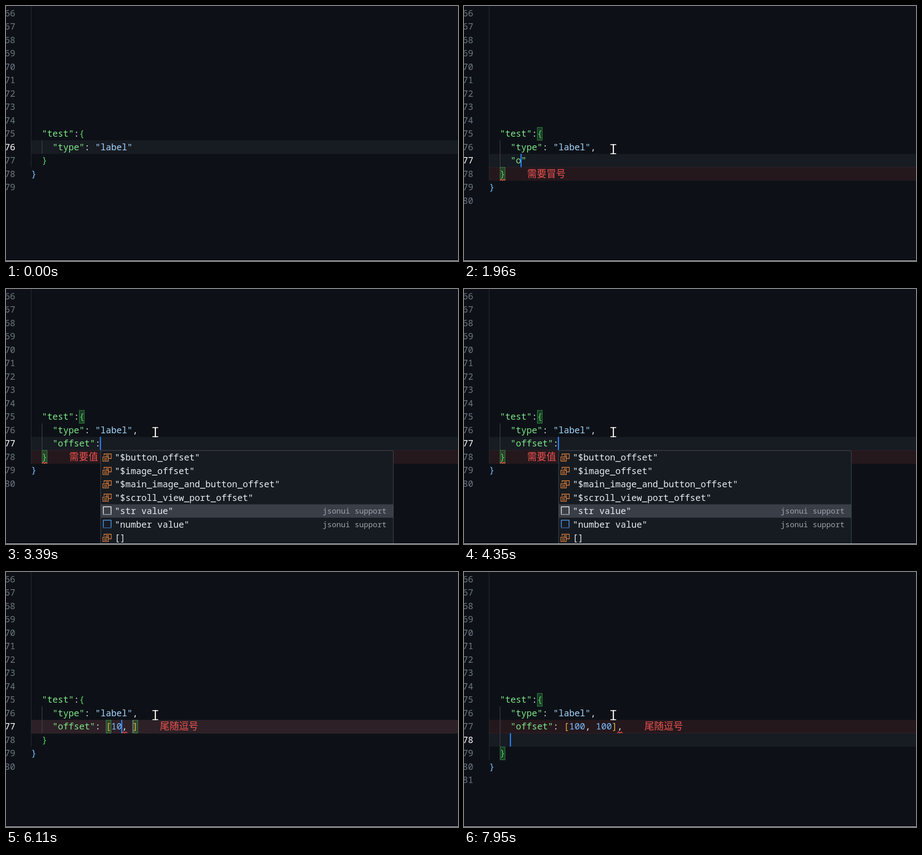
Animation of 996 by 562 pixels, one loop 8000 ms. Source, as an HTML page with a canvas:

```html
<!DOCTYPE html>
<html lang="zh">
<head>
<meta charset="utf-8">
<title>Editor completion</title>
<style>
html, body { margin: 0; width: 100%; height: 100%; overflow: hidden; background: #0d1117; }
canvas { display: block; }
</style>
</head>
<body>
<canvas id="stage" width="996" height="562"></canvas>
<script>
const LOOP = 8000, W = 996, H = 562;
const CHAR = 11.75, ROW = 29.5, LEFT = 55.5;
const MONO = '"Noto Sans Mono", "Noto Sans CJK SC", "Noto Sans CJK", monospace';
const CJK = '"Noto Sans CJK SC", "Noto Sans CJK", sans-serif';
const CODE = '19.58px ' + MONO, NOTE = '21.2px ' + CJK;
const WHITE = '#e6edf3', GREEN = '#7ee787', BLUE = '#79c0ff', ORANGE = '#f0883e', ACCENT = '#2f81f7';
const TRAILING = '尾随逗号', COLON = '需要冒号', VALUE = '需要值';
const ctx = document.getElementById('stage').getContext('2d');

const xOf = col => LEFT + col * CHAR;
const yOf = row => 296.3 + (row - 76) * ROW;

const entry = (value, col, more) => ({ body: ['    ' + value], col, caret: 1, ...more });

// Each step overrides part of the editor state from its time on.
const steps = [
  [0, { body: [], comma: '', col: 19, caret: 0, match: '', err: null, popup: null, stop: 0 }],
  [560, { caret: 1, match: '{' }],
  [990, { comma: ',', col: 20 }],
  [1020, { err: [76, TRAILING] }],
  [1240, { body: ['    '], col: 4 }],
  [1600, entry('""', 5)],
  [1630, { err: [78, COLON] }],
  [1960, entry('"o"', 6)],
  [2060, entry('"of"', 7)],
  [2090, { popup: { typed: 2 } }],
  [2570, entry('"off"', 8, { popup: { typed: 3 } })],
  [2930, entry('"offset"', 12, { popup: null })],
  [3330, entry('"offset":', 13)],
  [3360, { err: [78, VALUE] }],
  [3390, { popup: { pick: 4 } }],
  [3800, { caret: 0 }],
  [3960, { popup: { pick: 5 } }],
  [4320, { caret: 1 }],
  [4350, { popup: { pick: 4 } }],
  [4650, { popup: { pick: 5 } }],
  [4820, entry('"offset": [, ]', 15, { popup: null, stop: 1 })],
  [4850, { err: [77, VALUE], match: '[' }],
  [5390, { caret: 0 }],
  [5880, entry('"offset": [1, ]', 16)],
  [5910, { err: [77, TRAILING] }],
  [6060, entry('"offset": [10, ]', 17)],
  [6240, entry('"offset": [100, ]', 18)],
  [6400, { col: 20, stop: 0 }],
  [6780, entry('"offset": [100, 1]', 21)],
  [6810, { err: null }],
  [6910, entry('"offset": [100, 10]', 22)],
  [7010, entry('"offset": [100, 100]', 23)],
  [7270, { col: 24 }],
  [7720, entry('"offset": [100, 100],', 25)],
  [7750, { err: [77, TRAILING] }],
  [7780, { match: '{' }],
  [7950, { body: ['    "offset": [100, 100],', ''], col: 4 }]
];

const stateAt = t => Object.assign({}, ...steps.filter(s => s[0] <= t).map(s => s[1]));

function rect(x, y, w, h, color) {
  ctx.fillStyle = color;
  ctx.fillRect(x, y, w, h);
}

function text(str, x, y, color, font = CODE, align = 'left') {
  ctx.font = font;
  ctx.fillStyle = color;
  ctx.textAlign = align;
  ctx.fillText(str, x, y);
}

// Puts every character on the column grid.
function mono(str, x, y, color, font) {
  [...str].forEach((ch, i) => text(ch, x + i * CHAR, y, color, font));
}

function line(points, color, width = 1.3) {
  ctx.beginPath();
  points.forEach(([x, y]) => ctx.lineTo(x, y));
  ctx.strokeStyle = color;
  ctx.lineWidth = width;
  ctx.stroke();
}

function tokenColor(token, col) {
  if (token[0] === '"') return col > 4 ? '#a5d6ff' : GREEN;
  if (/[{}]/.test(token)) return col ? '#56d364' : BLUE;
  if (/[[\]]/.test(token)) return '#e3b341';
  return /\d/.test(token) ? BLUE : WHITE;
}

function drawCode(str, row) {
  for (const m of str.matchAll(/"[^"]*"|\d+|\S/g))
    mono(m[0], xOf(m.index), yOf(row) + 21.6, tokenColor(m[0], m.index));
}

function bracketBox(row, col) {
  const x = Math.round(xOf(col)), y = Math.round(yOf(row));
  rect(x, y, 12, 30, 'rgba(63,185,80,.25)');
  ctx.strokeStyle = 'rgba(63,185,80,.6)';
  ctx.lineWidth = 1;
  ctx.strokeRect(x + .5, y + .5, 11, 28);
}

function squiggle(row, col) {
  const x = xOf(col), y = yOf(row) + 28;
  line([0, 1, 2, 3, 4].map(i => [x + i * 3, y + (i % 2 ? -1.5 : 1.5)]), '#f85149', 1.5);
}

function drawEditor(s) {
  const lines = ['  "test":{', '    "type": "label"' + s.comma, ...s.body, '  }', '}', ''];
  const active = 76 + s.body.length, close = active + 1;
  const lineAt = row => lines[row - 75];

  rect(55, Math.round(yOf(active)), W, 30, '#171b22');
  if (s.err) rect(55, Math.round(yOf(s.err[0])), W, 30, 'rgba(228,84,84,.11)');
  rect(55, 0, 1, yOf(close + 1), '#272c33');
  rect(79, 296, 1, yOf(close) - 296, '#484e57');

  for (let n = 66; n < 75 + lines.length; n++)
    mono(String(n), -3, yOf(n) + 21.6, n === active ? '#fff' : '#6e7681');

  if (s.match === '{') {
    bracketBox(75, 9);
    bracketBox(close, 2);
  } else if (s.match === '[') {
    bracketBox(77, s.body[0].indexOf('['));
    bracketBox(77, s.body[0].indexOf(']'));
  }
  if (s.stop) rect(xOf(s.body[0].indexOf(']')) - .5, 326, 3, 29, 'rgba(125,133,144,.55)');
  lines.forEach((str, i) => drawCode(str, 75 + i));

  if (s.err) {
    const [row, message] = s.err, str = lineAt(row);
    squiggle(row, Math.max(str.lastIndexOf(','), str.lastIndexOf('}')));
    text(message, xOf(str.length) + 48.5, yOf(row) + 21.6, '#ef5350', NOTE);
  }
  if (s.caret) rect(xOf(s.col) - 1.5, yOf(active), 2.6, 29.5, ACCENT);
}

function panel(x, h) {
  ctx.beginPath();
  ctx.roundRect(x + .5, 356, 645, h, 4);
  ctx.fillStyle = '#161b22';
  ctx.fill();
  ctx.strokeStyle = '#484d54';
  ctx.lineWidth = 1;
  ctx.stroke();
}

const itemTop = i => 356.5 + i * ROW;
const highlight = (x, i) => rect(x + 1, itemTop(i), 644, ROW, '#393e47');

function drawKeys(x, typed) {
  const items = [['', 'set', '控件偏移量'], ['use_anchored_', 'set', '是否让子控件使用该控件的锚点']];
  panel(x, 63);
  highlight(x, 0);
  items.forEach(([before, after, detail], i) => {
    const y = itemTop(i) + 21.6, hit = x + 31 + before.length * CHAR;
    text('abc', x + 4.5, y - 2.5, i ? BLUE : '#fff', '600 12.5px "Open Sans", sans-serif');
    mono(before, x + 31, y, WHITE);
    mono('off'.slice(0, typed), hit, y, ACCENT, 'bold ' + CODE);
    mono('off'.slice(typed) + after, hit + typed * CHAR, y, WHITE);
    text(detail, x + 630.5, y - .5, '#9da3ab', '18.2px ' + CJK, 'right');
  });
}

function valueIcon(x, y) {
  line([[x + 8, y + 11], [x + 8, y + 7], [x + 24, y + 7], [x + 24, y + 17], [x + 18, y + 17]], ORANGE);
  ctx.strokeRect(x + 5.5, y + 13.5, 12, 9.5);
  [[12, 10], [12, 13], [8, 17], [8, 20]].forEach(([dx, dy]) =>
    line([[x + dx, y + dy], [x + dx + 7, y + dy]], ORANGE));
}

function snippetIcon(x, y, color) {
  line([[x + 6.5, y + 21], [x + 6.5, y + 5.5], [x + 23.5, y + 5.5], [x + 23.5, y + 21]], color, 1.5);
  for (let i = 0; i < 6; i++) rect(x + 6 + i * 3.3, y + 21.5, 1.7, 1.7, color);
}

function drawValues(x, pick) {
  const items = ['"$button_offset"', '"$image_offset"', '"$main_image_and_button_offset"',
    '"$scroll_view_port_offset"', '"str value"', '"number value"', '[]'];
  panel(x, 240);
  highlight(x, pick);
  items.forEach((label, i) => {
    const y = itemTop(i);
    mono(label, x + 31.5, y + 21.6, WHITE);
    if (label.includes(' value')) {
      snippetIcon(x, y, i === pick ? '#fff' : '#58a6ff');
      text('jsonui support', x + 630.5, y + 20.5, '#9da3ab', '16.75px ' + MONO, 'right');
    } else valueIcon(x, y);
  });
}

// Text pointer slides in from the lower right, then rests.
function drawPointer(t) {
  if (t < 30) return;
  const left = (1 - Math.min(1, (t - 30) / 490)) ** 2;
  const x = 329 + 535 * left, y = 315.5 + 243 * left;
  const shape = grow => {
    rect(x - 1.2 - grow, y - 11 - grow, 2.6 + 2 * grow, 22 + 2 * grow, ctx.fillStyle);
    for (const dy of [-11, 9])
      rect(x - 6.5 - grow, y + dy - grow, 13 + 2 * grow, 2 + 2 * grow, ctx.fillStyle);
  };
  ctx.fillStyle = '#000';
  shape(1);
  ctx.fillStyle = '#fff';
  shape(0);
}

function frame(now) {
  const t = now % LOOP, s = stateAt(t);
  rect(0, 0, W, H, '#0d1117');
  drawEditor(s);
  if (s.popup) {
    const x = Math.floor(xOf(s.col));
    if (s.popup.typed) drawKeys(x, s.popup.typed);
    else drawValues(x, s.popup.pick);
  }
  drawPointer(t);
  rect(0, 561, W, 1, '#f0f1f2');
  requestAnimationFrame(frame);
}
requestAnimationFrame(frame);
</script>
</body>
</html>
```
